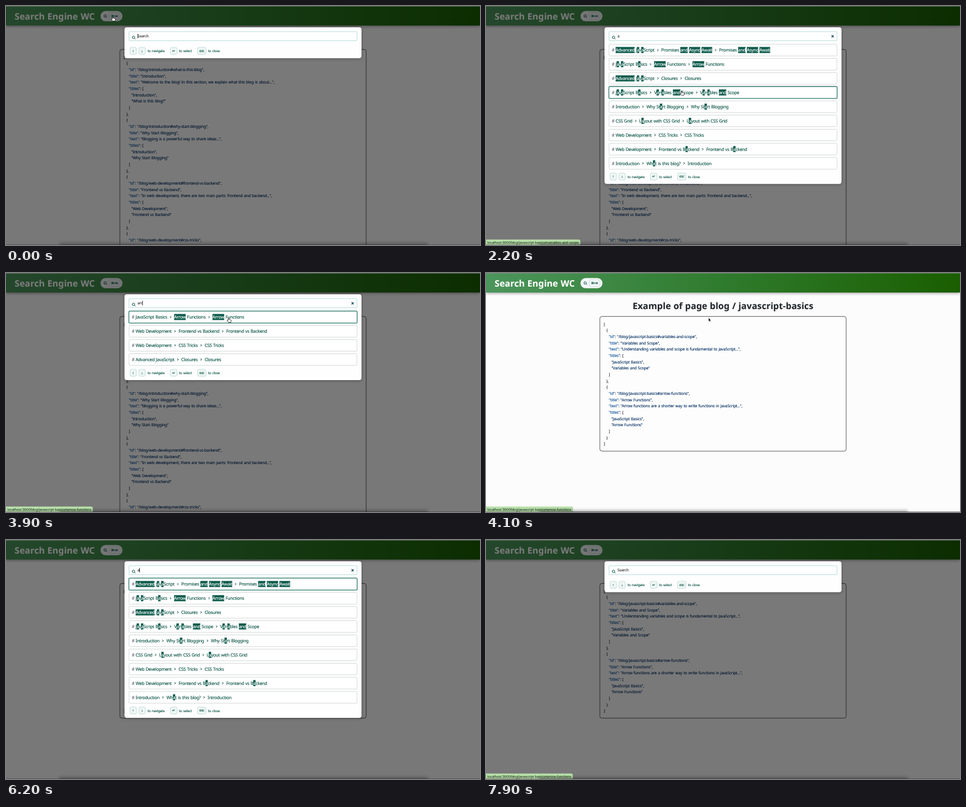
Recreate the animation shown at these times as an HTML page. Size 800 by 404 pixels, loop 8 s.

```html
<!DOCTYPE html>
<html lang="en">
<head>
<meta charset="utf-8">
<title>Search Engine WC</title>
<style>
html, body { margin: 0; width: 100%; height: 100%; overflow: hidden; }
/* Laid out at 4x and scaled back, so thin borders keep fractional positions. */
#stage {
  position: absolute; left: 0; top: 0; zoom: 4; transform: scale(.25); transform-origin: 0 0;
  width: 800px; height: 404px; overflow: hidden; background: #fcfcfc;
  font: 6.667px "Noto Sans", "Open Sans", sans-serif; letter-spacing: -.031em; word-spacing: .09em;
  white-space: pre; text-rendering: geometricPrecision; -webkit-text-stroke: .12px; color: #24292e;
}
#stage * { box-sizing: border-box; }
.abs, .line, .row, .row b, .key, .tip, svg { position: absolute; }
.title { font-weight: 700; font-size: 15px; letter-spacing: .008em; word-spacing: .02em; line-height: 20px; }
#head {
  left: 0; top: 0; width: 800px; height: 33px; color: #fff;
  background: linear-gradient(90deg, #4c955c, #2f7b2d 50%, #1a5e00); box-shadow: 0 1px 5px rgba(0,0,0,.45);
}
#pill { left: 159.5px; top: 8.5px; width: 37px; height: 17.3px; border-radius: 9px; background: #f3f8f7; }
#pill span {
  left: 14.5px; top: 2.6px; width: 18.6px; height: 12px; border: .7px solid #b5c4c0; border-radius: 3px;
  font: bold 5.4px/10.6px "Liberation Sans", "DejaVu Sans", sans-serif; letter-spacing: 0;
  text-align: center; color: #0b4f42;
}
#box { left: 191.67px; top: 72.9px; width: 416.67px; border: .83px solid #2a2a2a; border-radius: 4px; background: #fdfdfd; }
.line { line-height: 10.667px; }
.line i { font-style: normal; color: #12549c; }
.line u { text-decoration: none; color: #032f62; }
#dim { inset: 0; background: rgba(0,0,0,.52); }
#modal {
  left: 200px; top: 36px; width: 400px; background: #fefefe; border-radius: 4px;
  box-shadow: 0 1px 5px rgba(0,0,0,.3); color: #0b5547;
}
#field { left: 7.3px; top: 7px; width: 385.5px; height: 16px; border: .83px solid #a5d5d1; border-radius: 1px; }
#query { left: 22px; top: 7px; font-size: 6.25px; line-height: 16px; color: #333; }
#caret { display: inline-block; width: .8px; height: 7.6px; margin-right: -.8px; background: #000; vertical-align: -1.4px; }
.row {
  left: 7.3px; width: 385.5px; height: 20.4px; border: .83px solid #c8cccc; border-radius: 1.5px;
  background: #fff; font-size: 7.5px; letter-spacing: -.042em; line-height: 18.9px;
}
.row.on { border-color: #0b6355; box-shadow: 0 0 0 .5px #0b6355; }
.row b { left: 4.2px; font-weight: 400; color: #667; }
.row span { position: absolute; left: 10.7px; }
.row em {
  display: inline-block; width: 3px; height: 3px; margin: 0 5.2px 0 3.5px; vertical-align: 1.3px;
  border: solid #0b5547; border-width: .75px .75px 0 0; transform: rotate(45deg);
}
mark { background: #0b5a4b; color: #fff; }
#foot { left: 0; width: 400px; height: 12px; font-size: 5.9px; letter-spacing: -.045em; line-height: 12px; }
.key {
  top: -.2px; height: 12.4px; border: .8px solid #b4d6d0; border-radius: 2.5px; background: #eff7f5;
  line-height: 10.6px; text-align: center; font-size: 6.1px;
}
#status {
  left: 0; top: 394.5px; height: 9.5px; padding: 0 2.5px 0 2.3px; border-radius: 0 3px 0 0; background: #b6e0a8;
  border: solid #8fb386; border-width: .6px .6px 0 0; color: #111; -webkit-text-stroke: 0;
  font: 5.97px/10px "Liberation Sans", Arial, sans-serif; letter-spacing: 0; word-spacing: 0;
}
#edge { inset: 0; border-top: 1px solid rgba(140,146,140,.6); border-bottom: 1px solid rgba(60,60,60,.55); }
#dock { left: 92px; top: 403px; width: 618px; height: 4px; background: rgba(0,0,0,.35); box-shadow: 0 0 5px 2px rgba(0,0,0,.3); }
#hand, #arrow { left: 0; top: 0; overflow: visible; }
</style>
</head>
<body>
<div id="stage">
  <div id="head" class="abs">
    <div class="abs title" style="left:14.5px;top:7px">Search Engine WC</div>
    <div id="pill" class="abs">
      <svg style="left:5px;top:5.4px" width="7" height="7" fill="none" stroke="#0b4f42"><circle cx="2.8" cy="2.8" r="2"/><path d="M4.3 4.3 6 6"/></svg>
      <span class="abs">⌘+K</span>
    </div>
  </div>
  <div id="name" class="abs title" style="left:0;width:800px;top:44.7px;text-align:center"></div>
  <div id="box" class="abs"></div>
  <div id="json"></div>
  <div id="dim" class="abs"></div>
  <div id="modal" class="abs">
    <div id="field" class="abs"></div>
    <svg style="left:12px;top:13.8px" width="8" height="8" fill="none" stroke="#0b5547"><circle cx="3.2" cy="3.2" r="2.1"/><path d="M4.7 4.7 6.5 6.5"/></svg>
    <div id="query" class="abs"></div>
    <svg id="clear" style="left:382px;top:12.3px" width="6" height="6" stroke="#0b3f56" stroke-width="1.2"><path d="M1.2 1.2 4.8 4.8M4.8 1.2 1.2 4.8"/></svg>
    <div id="rows"></div>
    <div id="foot" class="abs"></div>
  </div>
  <div id="status" class="abs"></div>
  <div id="dock" class="abs"></div>
  <div id="edge" class="abs"></div>
  <svg id="hand" width="9" height="11" fill="#fff" stroke="#000" stroke-width=".7" stroke-linejoin="round">
    <path d="M-.7 4.8V.7Q0-.3.7.7V3.2L1.9 3.1 3.1 3.5 4.3 4Q4.8 4.3 4.6 5.4L4 8H.1L-2.4 4.9Q-2.2 3.8-1.4 4.4Z"/>
  </svg>
  <svg id="arrow" width="9" height="11" fill="#000" stroke="#fff" stroke-width=".6">
    <path d="M0 0V6.6L1.5 5.3 2.5 7.6 3.6 7.1 2.6 4.9H4.6Z"/>
  </svg>
</div>
<script>
const $ = id => document.getElementById(id);
const show = (el, on) => { el.style.display = on ? '' : 'none'; };
const slug = s => s.toLowerCase().replace(/\?/g, '').replace(/ /g, '-');
const LOOP = 8000, PITCH = 23.93;

// [page, section, last crumb when it differs]
const LINKS = {
  promises: ['Advanced JavaScript', 'Promises and Async Await'],
  arrow: ['JavaScript Basics', 'Arrow Functions'],
  closures: ['Advanced JavaScript', 'Closures'],
  scope: ['JavaScript Basics', 'Variables and Scope'],
  start: ['Introduction', 'Why Start Blogging'],
  grid: ['CSS Grid', 'Layout with CSS Grid'],
  tricks: ['Web Development', 'CSS Tricks'],
  ends: ['Web Development', 'Frontend vs Backend'],
  what: ['Introduction', 'What is this blog?', 'Introduction']
};
const HITS = {
  '': [],
  a: Object.keys(LINKS),
  ar: ['arrow', 'scope', 'start', 'closures', 'ends', 'tricks'],
  arr: ['arrow', 'ends', 'tricks', 'closures']
};
const TEXTS = {
  what: 'Welcome to the blog! In this section, we explain what this blog is about...',
  start: 'Blogging is a powerful way to share ideas...',
  ends: 'In web development, there are two main parts: frontend and backend...',
  tricks: 'Some handy tricks for styling pages...',
  scope: 'Understanding variables and scope is fundamental to JavaScript...',
  arrow: 'Arrow functions are a shorter way to write functions in JavaScript...'
};
const PAGES = [
  { name: 'Example of page blog', keys: ['what', 'start', 'ends', 'tricks'] },
  { name: 'Example of page blog / javascript-basics', keys: ['scope', 'arrow'] }
];

const path = key => `/blog/${slug(LINKS[key][0])}#${slug(LINKS[key][1])}`;

function jsonLines(keys) {
  const str = s => `<u>"${s}"</u>`, prop = (k, v) => [2, `<i>"${k}"</i>: ${v}`];
  const lines = [[0, '[']];
  keys.forEach((key, i) => {
    const [page, section, last = section] = LINKS[key];
    lines.push([1, '{'], prop('id', str(path(key)) + ','), prop('title', str(last) + ','),
      prop('text', str(TEXTS[key]) + ','), prop('titles', '['),
      [3, str(page) + ','], [3, str(section)], [2, ']'], [1, i < keys.length - 1 ? '},' : '}']);
  });
  return [...lines, [0, ']']];
}

function drawPage({ name, keys }) {
  const lines = jsonLines(keys);
  $('name').textContent = name;
  $('box').style.height = 15.3 + lines.length * 10.667 + 'px';
  $('json').innerHTML = lines.map(([depth, html], i) =>
    `<div class="line" style="left:${198.8 + depth * 4.2}px;top:${80.9 + i * 10.667}px">${html}</div>`).join('');
}

function drawRows(q) {
  const hits = HITS[q], n = hits.length;
  const re = new RegExp(`\\b${q}\\w*|${q}`, 'gi');
  $('rows').innerHTML = hits.map((key, i) => {
    const [page, section, last = section] = LINKS[key];
    const crumbs = [page, section, last].map(s => s.replace(re, '<mark>$&</mark>')).join('<em></em>');
    return `<div class="row" style="top:${28.3 + i * PITCH}px"><b>#</b><span>${crumbs}</span></div>`;
  }).join('');
  const mid = n ? 36.9 + n * PITCH : 39.7;
  $('foot').style.top = mid - 6 + 'px';
  $('modal').style.height = mid + 12.5 + 'px';
}

$('foot').innerHTML =
  [[9, 11.5, '↑'], [24, 11.5, '↓'], [77, 12, '↵'], [123, 15, 'esc']].map(([x, w, s]) =>
    `<div class="key" style="left:${x}px;width:${w}px">${s}</div>`).join('') +
  [[39, 'to navigate'], [92, 'to select'], [141, 'to close']].map(([x, s]) =>
    `<div class="tip" style="left:${x}px">${s}</div>`).join('');

const TYPED = [[0, ''], [700, 'a'], [2300, 'ar'], [2500, 'arr'], [4000, ''], [5600, ''], [6100, 'a'], [7600, '']];
const MOVES = [[0, 180, 17.5], [900, 180, 17.5], [1200, 330.5, 98.5], [1400, 330.5, 98.5], [1900, 330, 143],
  [3100, 330, 143], [3700, 375.5, 75.5], [8000, 375.5, 75.5]];
const within = (t, a, b) => t >= a && t < b;

function pointer(t) {
  const i = MOVES.findIndex(m => m[0] > t);
  const [t0, x0, y0] = MOVES[i - 1], [t1, x1, y1] = MOVES[i];
  const k = (t - t0) / (t1 - t0), e = k * k * (3 - 2 * k);
  return [x0 + (x1 - x0) * e, y0 + (y1 - y0) * e];
}

let lastPage, lastQuery;

function render(t) {
  const open = !within(t, 4000, 5600);
  const [since, q] = TYPED.filter(k => k[0] <= t).pop();
  const [x, y] = pointer(t);

  const page = PAGES[t < 4000 ? 0 : 1];
  if (page !== lastPage) drawPage(lastPage = page);
  if (q !== lastQuery) drawRows(lastQuery = q);

  const hover = Math.max(0, Math.floor((y - 64.3) / PITCH));
  const sel = t < 4000 ? hover : t < 7000 ? 0 : 1;
  [...$('rows').children].forEach((row, i) => row.classList.toggle('on', i === sel));

  const caret = (t - since) % 1000 < 500 && t < 7000 ? '<span id="caret"></span>' : '';
  $('query').innerHTML = q ? q + caret : caret + 'Search';
  show($('clear'), q);
  show($('dim'), open);
  show($('modal'), open);

  const link = t < 4000 ? HITS[q][sel] : 'arrow';
  const status = within(t, 1300, 4900) || t >= 7100;
  show($('status'), status);
  if (status) $('status').textContent = 'localhost:3000' + path(link);

  const seen = t < 700 || within(t, 900, 2300) || within(t, 3100, 4900);
  const hand = open && (t < 900 || y > 64);
  show($('hand'), seen && hand);
  show($('arrow'), seen && !hand);
  for (const id of ['hand', 'arrow']) $(id).style.transform = `translate(${x}px,${y}px)`;
}

const begin = performance.now();
function tick() {
  const t = (performance.now() - begin) % LOOP;
  render(Math.floor(t / 100) * 100);
  requestAnimationFrame(tick);
}
tick();
</script>
</body>
</html>
```
